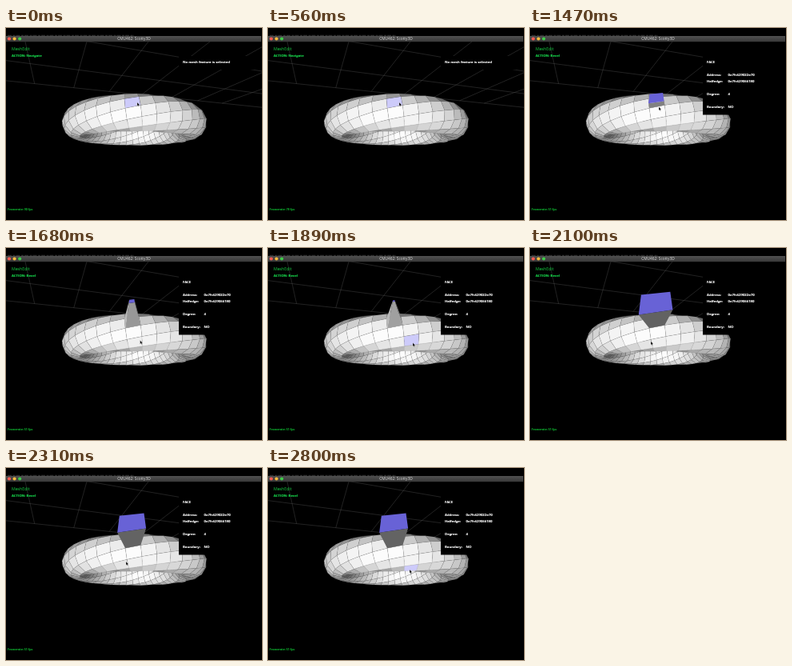
These frames come from a looping animation (320 by 240 pixels, 3290 ms). An HTML page:

```html
<!DOCTYPE html>
<html lang="en">
<head>
<meta charset="utf-8">
<title>Mesh bevel</title>
<style>
  html, body { margin: 0; width: 100%; height: 100%; overflow: hidden; background: #000; }
  svg { display: block; width: 100vw; height: 100vh; }
  text { font: 700 4.25px "Open Sans", "Noto Sans", sans-serif; fill: #fff; stroke: #fff; stroke-width: .12; }
  #title { font-weight: 400; font-size: 4.8px; text-anchor: middle; fill: #ddd; stroke: none; }
  .mode { font-weight: 400; font-size: 5.2px; fill: #12a034; stroke: #12a034; }
  #action { fill: #18d84c; stroke: #18d84c; }
  #fps { font-size: 3.6px; fill: #0fa02c; stroke: #0fa02c; }
  #grid line { stroke: #4c4c4c; stroke-width: .45; }
  #torus polygon { stroke: rgba(110, 110, 110, .35); stroke-width: .3; }
</style>
</head>
<body>
<svg viewBox="0 0 320 240" preserveAspectRatio="none">
  <defs>
    <linearGradient id="metal" x2="0" y2="1">
      <stop stop-color="#505050"/><stop offset="1" stop-color="#383838"/>
    </linearGradient>
  </defs>
  <rect width="320" height="240"/>
  <g id="grid"></g>
  <g id="torus"></g>
  <g id="bevel"></g>

  <g id="empty">
    <rect x="216" y="35" width="104" height="17"/>
    <text x="221" y="44">No mesh feature is selected</text>
  </g>
  <g id="info">
    <rect x="216" y="17" width="104" height="91.5"/>
    <text x="221" y="44">FACE</text>
    <text x="221" y="60">Address:</text><text x="247.5" y="60">0x7fc629022e70</text>
    <text x="221" y="68">Halfedge:</text><text x="247.5" y="68">0x7fc629066180</text>
    <text x="221" y="84">Degree:</text><text x="247.5" y="84">4</text>
    <text x="221" y="100">Boundary:</text><text x="247.5" y="100">NO</text>
  </g>

  <text class="mode" x="7" y="27.8">MeshEdit</text>
  <text id="action" x="7" y="35.8"></text>
  <text id="fps" x="2" y="227.5"></text>

  <rect width="320" height="10"/>
  <path d="M2 9.3H160" stroke="#484848" stroke-width=".8" stroke-dasharray="5 1.5 3 1"/>
  <rect y="10" width="319" height="7.2" fill="url(#metal)"/>
  <circle cx="4" cy="13.5" r="2.1" fill="#fb5a52"/>
  <circle cx="10.6" cy="13.5" r="2.1" fill="#f5bb3c"/>
  <circle cx="17.2" cy="13.5" r="2.1" fill="#3fcc4a"/>
  <text id="title" x="160" y="15.4">CMU462: Scotty3D</text>

  <path id="cursor" d="M0 0v4.4l1-.9 .8 1.6 .7-.4-.7-1.5h1.3z" stroke="#eee" stroke-width=".25"/>
</svg>
<script>
const LOOP = 3290, STEP = 70, PICK = 1330;
const $ = id => document.getElementById(id);
const clamp = (v, lo, hi) => Math.max(lo, Math.min(hi, v));
const mix = (a, b, p) => a + (b - a) * p;

function add(parent, tag, attrs) {
  const el = document.createElementNS('http://www.w3.org/2000/svg', tag);
  for (const key in attrs) el.setAttribute(key, attrs[key]);
  return parent.appendChild(el);
}
const toPoints = pts => pts.map(p => p[0].toFixed(2) + ',' + p[1].toFixed(2)).join(' ');
const cross = (a, b) => a[0] * b[1] - b[0] * a[1];
const area = pts => pts.reduce((sum, p, i) => sum + cross(p, pts[(i + 1) % pts.length]), 0);
const inside = (pts, x, y) => pts.every((p, i) => {
  const q = pts[(i + 1) % pts.length];
  return cross([q[0] - p[0], q[1] - p[1]], [x - p[0], y - p[1]]) >= 0;
});
const grey = v => { v = Math.round(clamp(v, 0, 252)); return `rgb(${v},${v},${v})`; };

// Ground grid seen from below: two line families with vanishing points on one horizon
const HORIZON = 170, VX = 58, WX = 998, EDGE = 66;
for (let n = 0; n < 4; n++) {
  const drop = 1 / (.0096 - .00187 * n);
  add($('grid'), 'line', { x1: 0, y1: HORIZON - drop, x2: 320, y2: HORIZON - drop * (1 - 320 / WX) });
}
for (let x = -53; x < 500; x += 77) {
  const dx = (VX - x) / (HORIZON - 17), m = (HORIZON - EDGE) / WX;
  const y2 = (EDGE + m * (x - 17 * dx)) / (1 - m * dx);
  add($('grid'), 'line', { x1: x, y1: 17, x2: x + dx * (y2 - 17), y2 });
}

// Torus whose rows and columns both wind helically
const R = 68.5, r = 18, DIST = 288, TILT = 10.5 * Math.PI / 180;
const COLS = 40, ROWS = 11, DU = 2 * Math.PI / COLS, DV = 2 * Math.PI / ROWS;
const SIN = Math.sin(TILT), COS = Math.cos(TILT);

const tilt = (y, z) => [y * COS + z * SIN, z * COS - y * SIN];
function angles(i, j) {
  const u = .064 + (i - 1 - j / ROWS) * DU;
  return [u, .07 + j * DV + u];
}
function project(i, j) {
  const [u, v] = angles(i, j), ring = R + r * Math.cos(v);
  const [up, depth] = tilt(r * Math.sin(v), ring * Math.cos(u));
  const k = DIST / (DIST - depth);
  return [160.5 + ring * Math.sin(u) * k, 122 - up * k, depth];
}
function shade(i, j) {
  const [u, v] = angles(i + .5, j + .5);
  const [up, depth] = tilt(Math.sin(v), Math.cos(v) * Math.cos(u));
  const light = .97 * depth - .15 * up - .15 * Math.cos(v) * Math.sin(u);
  return grey(60 + 195 * Math.max(0, light) ** .7);
}
const corners = (i, j) => [project(i, j + 1), project(i + 1, j + 1), project(i + 1, j), project(i, j)];

const faces = [];
for (let i = -COLS / 2; i < COLS / 2; i++) {
  for (let j = -5; j < ROWS - 5; j++) {
    const pts = corners(i, j);
    if (area(pts) > 0) faces.push({ pts, depth: project(i + .5, j + .5)[2], fill: shade(i, j) });
  }
}
faces.sort((a, b) => a.depth - b.depth);
for (const f of faces) f.el = add($('torus'), 'polygon', { points: toPoints(f.pts), fill: f.fill });
const faceAt = (x, y) => faces.filter(f => inside(f.pts, x, y)).pop();

// Bevelled face: four sides and a cap
const base = corners(0, 0);
const sides = base.map(() => add($('bevel'), 'polygon', {}));
const cap = add($('bevel'), 'polygon', { fill: '#6862d6' });
const SHAPE = [[-.47, -.26], [.46, -.36], [.54, .22], [-.55, .38]];

function drawBevel(lift, size) {
  const x = mix(158, 157.3, lift), y = mix(92, 66 + .07 * size, lift);
  const top = SHAPE.map(([a, b]) => [x + a * size, y + b * size]);
  const tones = [190, 115, Math.max(98, 165 - 2 * size), 185];
  sides.forEach((el, k) => {
    const n = (k + 1) % 4, quad = [base[k], base[n], top[n], top[k]];
    el.setAttribute('points', area(quad) > 0 ? toPoints(quad) : '');
    el.setAttribute('fill', grey(tones[k]));
  });
  cap.setAttribute('points', toPoints(top));
}

// Key points: time, then values, joined by straight lines and held at both ends
const POINTER = [[1050, 164, 93], [1470, 161, 98.5], [1610, 161, 114], [1820, 181, 118.5],
  [1890, 181, 118.5], [2170, 141, 116], [2310, 150, 117], [2450, 150, 117], [2800, 177, 127]];
const SIZE = [[1540, 18], [1820, 2.5], [1890, 2.5], [2170, 98], [2310, 33]]
  .map(([t, s]) => [t, Math.log(s)]);

function track(keys, t) {
  const n = keys.findIndex(k => k[0] > t);
  if (n < 1) return keys[n ? keys.length - 1 : 0].slice(1);
  const a = keys[n - 1], b = keys[n], p = (t - a[0]) / (b[0] - a[0]);
  return a.slice(1).map((v, i) => mix(v, b[i + 1], p));
}
const dragging = t => t >= PICK && t < 1820 || t > 1890 && t < 2450;
const show = (id, on) => { $(id).style.display = on ? '' : 'none'; };

let hovered = null;
function draw(t) {
  const [x, y] = track(POINTER, t), picked = t >= PICK;
  if (hovered) hovered.el.setAttribute('fill', hovered.fill);
  hovered = dragging(t) ? null : faceAt(x, y);
  if (hovered) hovered.el.setAttribute('fill', '#cdcbfa');

  show('bevel', picked);
  show('info', picked);
  show('empty', !picked);
  if (picked) drawBevel(clamp((y - 95) / 19, 0, 1), Math.exp(track(SIZE, t)[0]));

  $('cursor').setAttribute('transform', `translate(${x} ${y})`);
  $('action').textContent = 'ACTION: ' + (t < 1120 ? 'Navigate' : 'Bevel');
  $('fps').textContent = `Framerate: ${picked ? 51 : t < 560 ? 90 : 78} fps`;
}

const start = performance.now();
let last = -1;
function tick() {
  const t = Math.floor((performance.now() - start) % LOOP / STEP) * STEP;
  if (t !== last) draw(last = t);
  requestAnimationFrame(tick);
}
tick();
</script>
</body>
</html>
```
